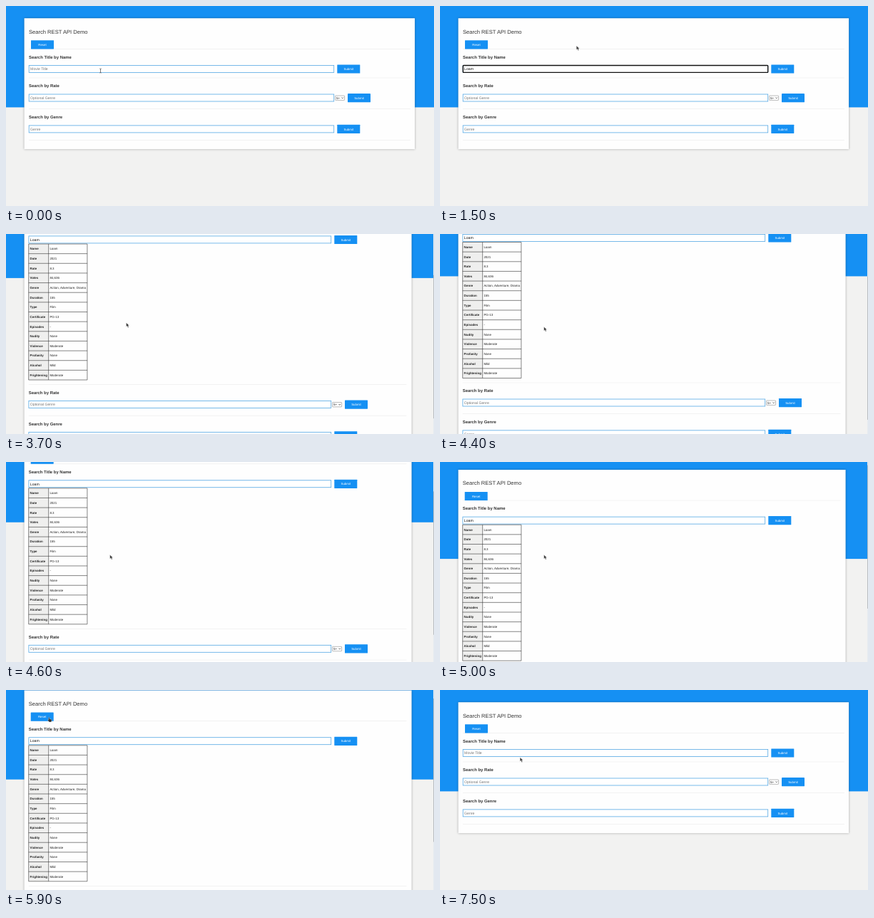
Recreate the animation shown at these times as an HTML page. Size 600 by 281 pixels, loop 8000 ms.

```html
<!DOCTYPE html>
<html lang="en">
<head>
<meta charset="utf-8">
<title>Search demo</title>
<style>
  html, body { margin: 0; width: 100%; height: 100%; overflow: hidden; background: #f2f2f1; }
  svg { display: block; width: 600px; height: 281px; font-family: "Liberation Sans", Arial, sans-serif; text-rendering: geometricPrecision; }
  .card { fill: #fefefe; filter: drop-shadow(0 .8px 1.6px rgba(0, 0, 0, .35)); }
  .title { font-size: 7.58px; fill: #333; }
  .head { font-size: 5.93px; font-weight: bold; fill: #333; }
  .hint { font-size: 5.16px; fill: #757575; }
  .value { font-size: 5.16px; fill: #111; }
  .label { font-size: 4.4px; fill: #fff; text-anchor: middle; }
  .cell { font-size: 4.45px; fill: #222; }
  .key { font-size: 4.43px; font-weight: bold; fill: #222; }
  .field { fill: #fff; stroke: #55a8e4; stroke-width: .8; }
  .focus { fill: none; stroke: #111; stroke-width: 1.4; }
  .button, .sky { fill: #1590f3; }
  .rule { fill: #ebebeb; }
  .menu { fill: #fff; stroke: #c8c8c8; stroke-width: .4; filter: drop-shadow(0 .6px 1px rgba(0, 0, 0, .25)); }
</style>
</head>
<body>
<svg id="stage" viewBox="0 0 600 281"></svg>
<script>
const NS = 'http://www.w3.org/2000/svg';
const stage = document.getElementById('stage');
const LOOP = 8000, TITLE = 'Loam', TABLE_H = 191, PAGE_H = 392, VIEW_H = 281;

const DETAILS = [
  ['Name', TITLE], ['Date', '2021'], ['Rate', '8.3'], ['Votes', '84,636'],
  ['Genre', 'Action, Adventure, Drama'], ['Duration', '155'], ['Type', 'Film'],
  ['Certificate', 'PG-13'], ['Episodes', '-'], ['Nudity', 'None'],
  ['Violence', 'Moderate'], ['Profanity', 'None'], ['Alcohol', 'Mild'],
  ['Frightening', 'Moderate']
];
const SUGGESTIONS = [TITLE, 'Lantern', 'Ladder', 'Meadow', 'Harbor', 'Pebble'];

// [time, value...], linear between rows
const SCROLL = [
  [2800, 0], [3500, 74], [3700, 80.5], [3900, 83], [4400, 83], [4700, 45],
  [4800, 45], [5000, 6.3], [5200, 6.3], [5700, 16.7]
];
const POINTER = [
  [1200, 132.5, 91], [1500, 191.3, 56], [1800, 191.3, 56], [2400, 479, 90],
  [2900, 479, 90], [3500, 205, 118], [3700, 168.6, 124.8], [4100, 168.6, 124.8],
  [4400, 145.7, 130.5], [5200, 145.7, 130.5], [5700, 71, 44.5], [5900, 58.5, 38.2],
  [6900, 58.5, 38.2], [7300, 111.6, 95.4], [7400, 111.6, 95.4], [7500, 112.2, 94.8]
];
// [time, value], held until the next row
const TYPED = [[0, 0], [500, 1], [700, 2], [900, 3], [1000, 4]];
const MENU = [[0, 0], [200, 6], [500, 3], [700, 1], [1100, 0]];
const SHAPE = [[0, 'beam'], [1300, 'arrow'], [2400, 'hand'], [2900, 'arrow'], [5900, 'hand'], [6500, 'arrow']];

function add(parent, tag, attrs = {}, text) {
  const node = document.createElementNS(NS, tag);
  for (const name in attrs) node.setAttribute(name, attrs[name]);
  if (text !== undefined) node.textContent = text;
  return parent.appendChild(node);
}
const group = parent => add(parent, 'g');
const box = (parent, cls, x, y, width, height, more) =>
  add(parent, 'rect', { class: cls, x, y, width, height, ...more });
const write = (parent, cls, x, y, text) => add(parent, 'text', { class: cls, x, y }, text);

function button(parent, x, y, text) {
  box(parent, 'button', x, y, 32, 12.2, { rx: .4 });
  write(parent, 'label', x + 16, y + 7.7, text);
}

function field(parent, y, right, hint) {
  box(parent, 'field', 32.2, y - 5, right - 32.2, 10);
  return write(parent, 'hint', 34.1, y + 1.8, hint);
}

function details(parent) {
  const top = 94.5, row = TABLE_H / DETAILS.length;
  box(parent, '', 32, top, 28, TABLE_H, { fill: '#efefee' });
  let lines = `M32 ${top}V${top + TABLE_H}M60 ${top}v${TABLE_H}M114.2 ${top}v${TABLE_H}`;
  DETAILS.forEach(([key, value], i) => {
    const y = top + i * row;
    lines += `M32 ${y}H114.2`;
    write(parent, 'key', 33.9, y + 8.4, key);
    write(parent, 'cell', 61.7, y + 8.4, value);
  });
  lines += `M32 ${top + TABLE_H}H114.2`;
  add(parent, 'path', { d: lines, fill: 'none', stroke: '#333', 'stroke-width': .6 });
}

function buildPage(found) {
  const page = group(stage);
  const cut = found ? 3.7 : 0, extra = found ? TABLE_H : 0, right = 459.7 - cut;
  box(page, 'sky', 0, 0, 600, 142.4);
  box(page, 'card', 25.6, 17.2, found ? 543 : 547.5, 184 + extra);
  const body = group(page);
  if (found) body.setAttribute('transform', 'translate(-.3 0)');
  const rule = (parent, y) => box(parent, 'rule', 32, y, 535 - cut * 1.4, .6);

  rule(body, 60);
  write(body, 'title', 32, 38.6, 'Search REST API Demo');
  button(body, 35, 48.2, 'Reset');
  write(body, 'head', 32, 73.7, 'Search Title by Name');
  const input = field(body, 88.4, right, 'Movie Title');
  button(body, 464.3 - cut, 82.4, 'Submit');
  if (found) {
    input.textContent = TITLE;
    input.setAttribute('class', 'value');
    details(body);
  }

  const lower = add(body, 'g', { transform: `translate(0 ${extra})` });
  rule(lower, 100.7);
  write(lower, 'head', 32, 114.2, 'Search by Rate');
  field(lower, 129, right, 'Optional Genre');
  box(lower, '', 461.6 - cut, 126, 13, 6.4, { fill: '#fff', stroke: '#777', 'stroke-width': .5, rx: .6 });
  write(lower, 'cell', 463 - cut, 130.8, '5+');
  add(lower, 'path', { d: `M${470.4 - cut} 128.5l1.3 1.3 1.3-1.3`, fill: 'none', stroke: '#222', 'stroke-width': .7 });
  button(lower, 479 - cut, 123, 'Submit');
  rule(lower, 144.4);
  write(lower, 'head', 32, 158.1, 'Search by Genre');
  field(lower, 172.9, right, 'Genre');
  button(lower, 464.3 - cut, 166.8, 'Submit');
  rule(lower, 188.4);
  return { page, input };
}

const form = buildPage(false), result = buildPage(true);
const ring = box(stage, 'focus', 32.3, 83.5, 427.4, 9.9, { rx: .8 });

const menu = group(stage);
const menuBox = box(menu, 'menu', 32.4, 96, 60, 10, { rx: 1 });
const items = SUGGESTIONS.map((word, i) => write(menu, 'cell', 36, 106.1 + i * 11, word));

const bar = group(stage);
box(bar, '', 599, 0, 1, VIEW_H, { fill: '#e6ebef' });
const thumb = box(bar, '', 599, 0, 1, VIEW_H * VIEW_H / PAGE_H, { fill: '#b9bdc1' });

const pointer = group(stage);
const outline = { fill: '#333', stroke: '#fff', 'stroke-width': .3 };
const shapes = {
  beam: add(pointer, 'path', { d: 'M-1.2-3Q0-3 0-2Q0-3 1.2-3M0-2V2M-1.2 3Q0 3 0 2Q0 3 1.2 3', fill: 'none', stroke: '#444', 'stroke-width': .7 }),
  arrow: add(pointer, 'path', { d: 'M0 0V5.4L1.3 4.3 2.3 6.6 3.4 6.1 2.4 3.9H4.2Z', ...outline }),
  hand: add(pointer, 'path', { d: 'M1.2 .4Q2-.2 2.5.6V2.5L5 3Q5.8 3.2 5.6 4.2L5 6.8H2L0 4.2Q-.2 3.2 1.2 3.6Z', ...outline })
};

function held(rows, t) {
  let value = rows[0][1];
  for (const [at, next] of rows) if (t >= at) value = next;
  return value;
}

function between(rows, t) {
  const next = rows.findIndex(row => row[0] > t);
  if (next === 0) return rows[0].slice(1);
  if (next < 0) return rows[rows.length - 1].slice(1);
  const a = rows[next - 1], b = rows[next], k = (t - a[0]) / (b[0] - a[0]);
  return a.slice(1).map((v, i) => v + (b[i + 1] - v) * k);
}

const show = (node, on) => { node.style.display = on ? '' : 'none'; };

function render(now) {
  const t = Math.floor(now % LOOP / 100) * 100;
  const found = t >= 2700 && t < 6500;
  show(form.page, !found);
  show(result.page, found);
  show(bar, found);

  const [scroll] = between(SCROLL, t);
  result.page.setAttribute('transform', `translate(0 ${-scroll})`);
  thumb.setAttribute('y', scroll * VIEW_H / PAGE_H);

  const typed = t < 2700 ? TITLE.slice(0, held(TYPED, t)) : '';
  form.input.textContent = typed || 'Movie Title';
  form.input.setAttribute('class', typed ? 'value' : 'hint');
  show(ring, t >= 100 && t < 1600);

  const count = held(MENU, t);
  show(menu, count);
  menuBox.setAttribute('width', count > 3 ? 68 : 60);
  menuBox.setAttribute('height', 6 + count * 11);
  items.forEach((item, i) => show(item, i < count));

  const [x, y] = between(POINTER, t);
  pointer.setAttribute('transform', `translate(${x} ${y})`);
  const kind = held(SHAPE, t);
  for (const name in shapes) show(shapes[name], name === kind);
}

function tick() {
  render(performance.now());
  requestAnimationFrame(tick);
}
tick();
</script>
</body>
</html>
```
